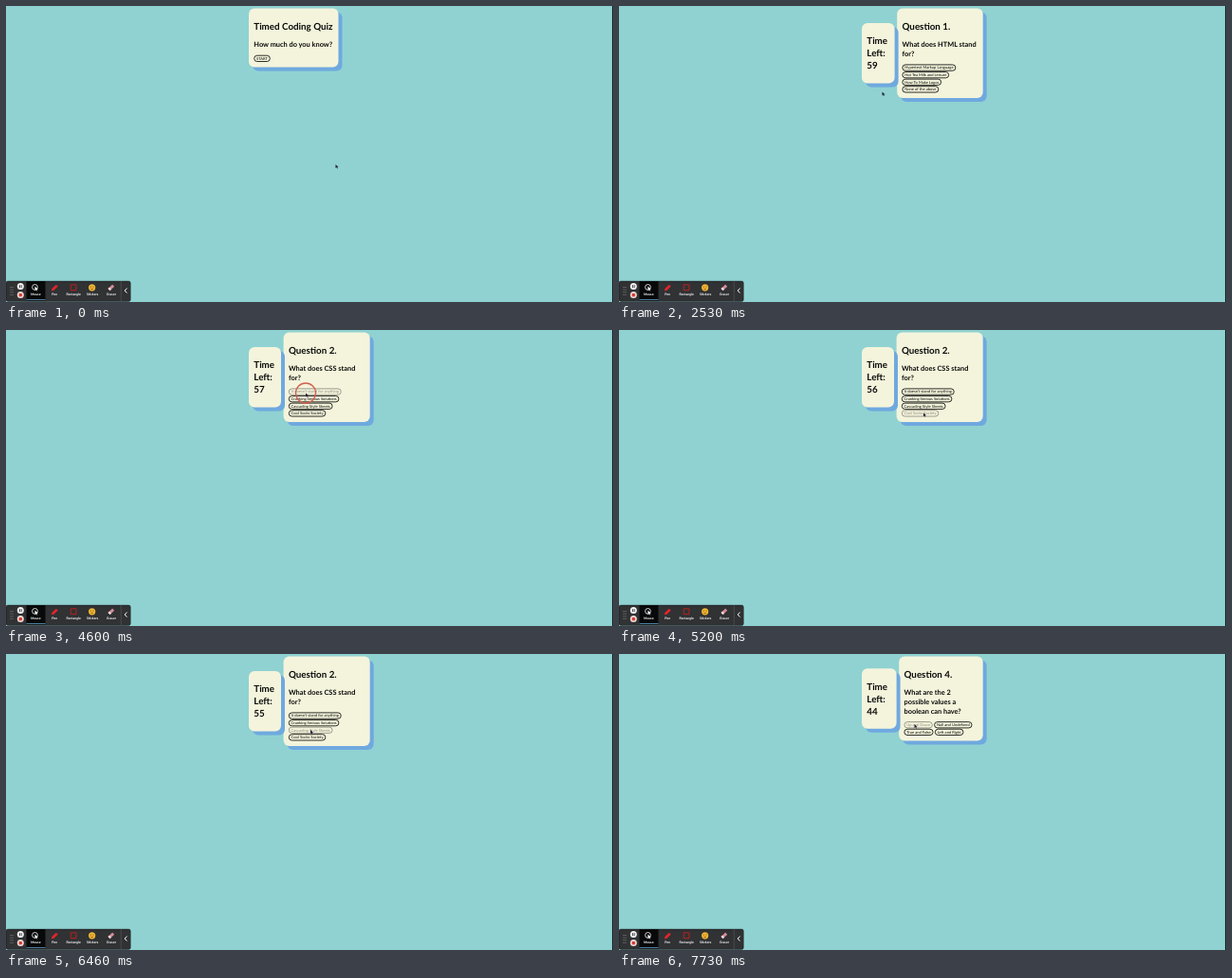
Recreate the animation shown at these times as an HTML page with a canvas. Size 640 px wide and 312 px high, loop 8000 ms.

```html
<!DOCTYPE html>
<html lang="en">
<head>
<meta charset="utf-8">
<title>Timed Coding Quiz</title>
<style>
  html, body { margin: 0; width: 100%; height: 100%; overflow: hidden; background: #90d2d2; }
  canvas { display: block; width: 640px; height: 312px; }
</style>
</head>
<body>
<canvas id="stage"></canvas>
<script>
const LOOP = 8000;
const BACK = '#90d2d2', CREAM = '#f4f4dc', SHADOW = '#6fa9df', INK = '#0b0b0b', FADED = '#8c8c80';
const LEFT = 256, TOP = 2.5, RIGHT = 383.7, PAD = 5.3;   // quiz area
const H1 = 9.8, H2 = 7.4, SMALL = 4.1;                   // font sizes
const LINE = 9.7, ROW = 7.6, BUTTON = 7.1;               // vertical steps

const canvas = document.getElementById('stage');
const ctx = canvas.getContext('2d');
const ratio = window.devicePixelRatio || 1;
canvas.width = 640 * ratio;
canvas.height = 312 * ratio;

const htmlQuestion = { title: 'Question 1.', text: ['What does HTML stand', 'for?'] };
const screens = [
  { at: 0, title: 'Timed Coding Quiz', text: ['How much do you know?'], rows: [['START']] },
  { at: 1200, timer: 32.3, ...htmlQuestion,
    rows: [['Hypertext Markup Language'], ['Hot Tea Milk and Leisure'], ['How To Make Logos', 'None of the above']] },
  { at: 2060, timer: 34.6, ...htmlQuestion,
    rows: [['Hypertext Markup Language'], ['Hot Tea Milk and Leisure'], ['How To Make Logos'], ['None of the above']] },
  { at: 4590, timer: 34, title: 'Question 2.', text: ['What does CSS stand', 'for?'],
    rows: [["It doesn't stand for anything"], ['Cranking Serious Solutions'], ['Cascading Style Sheets'], ['Cool Socks Society']] },
  { at: 6730, timer: 39.2, title: 'Question 3.', text: ['Which is an example', 'of a HTML', 'tag/element?'],
    rows: [['(div)', '[div]', '{div}', '<div>']] },
  { at: 7660, timer: 36.6, title: 'Question 4.', text: ['What are the 2', 'possible values a', 'boolean can have?'],
    rows: [['Up and Down', 'Null and Undefined'], ['True and False', 'Left and Right']] }
];

// Every new title follows a click.
const clicks = screens
  .filter((s, i) => i && s.title !== screens[i - 1].title)
  .map(s => s.at - 130);

const moves = [
  { from: 60, to: 660, x: 275.5, y: 56 },
  { from: 2060, to: 2530, x: 277.5, y: 90.5 },
  { from: 3130, to: 4400, x: 316, y: 66.5 },
  { from: 4660, to: 5460, x: 322.5, y: 94 },
  { from: 6000, to: 6450, x: 321, y: 80 },
  { from: 6730, to: 7020, x: 311.5, y: 74 }
];

function pointer(t) {
  let x = 347.5, y = 167;
  for (const m of moves) {
    const k = Math.min(1, Math.max(0, (t - m.from) / (m.to - m.from)));
    const ease = k * k * (3 - 2 * k);
    x += (m.x - x) * ease;
    y += (m.y - y) * ease;
  }
  return { x, y };
}

function secondsLeft(t) {
  const wrong = t >= screens.at(-1).at ? 10 : 0;
  return 59 - Math.floor((t - 2060) / 1014) - wrong;
}

function paint(fill, stroke, line = 1) {
  if (fill) { ctx.fillStyle = fill; ctx.fill(); }
  if (stroke) { ctx.strokeStyle = stroke; ctx.lineWidth = line; ctx.stroke(); }
}

function box(x, y, w, h, r, ...style) {
  ctx.beginPath();
  ctx.roundRect(x, y, w, h, r);
  paint(...style);
}

function disc(x, y, r, ...style) {
  ctx.beginPath();
  ctx.arc(x, y, r, 0, 2 * Math.PI);
  paint(...style);
}

function line(x0, y0, x1, y1, color, width) {
  ctx.beginPath();
  ctx.moveTo(x0, y0);
  ctx.lineTo(x1, y1);
  paint(null, color, width);
}

function arrow(x, y, size, fill) {
  ctx.beginPath();
  ctx.moveTo(x, y);
  ctx.lineTo(x, y + size);
  ctx.lineTo(x + size * .3, y + size * .75);
  ctx.lineTo(x + size * .75, y + size * .7);
  ctx.closePath();
  paint(fill);
  line(x + size * .2, y + size * .5, x + size * .5, y + size * 1.1, fill, size * .2);
}

function setFont(size, weight) {
  ctx.font = `${weight} ${size}px Lato, sans-serif`;
}

function write(str, x, y, size, weight = 700, fill = INK, align = 'left') {
  setFont(size, weight);
  ctx.textAlign = align;
  ctx.fillStyle = fill;
  ctx.fillText(str, x, y);
}

function panel(x, y, w, h) {
  box(x + 4, y + 4, w, h, 6, SHADOW);
  box(x, y, w, h, 6, CREAM);
}

function drawButton(label, x, y, w, mouse) {
  const hover = mouse.x > x && mouse.x < x + w && mouse.y > y && mouse.y < y + BUTTON;
  const color = hover ? FADED : INK;
  box(x + .4, y + .4, w - .8, BUTTON - .8, 3.1, null, color, .85);
  write(label, x + w / 2, y + 4.95, SMALL, 400, color, 'center');
}

function drawTimer(t, w, middle) {
  const lines = ['Time', 'Left:'];
  if (t >= 2060) lines.push(String(secondsLeft(t)));
  const h = 24.5 + 13 * lines.length, y = middle - h / 2;
  panel(LEFT, y, w, h);
  lines.forEach((str, i) => write(str, LEFT + PAD, y + 22.4 + 13 * i, H1));
}

function drawScreen(t, mouse) {
  const s = screens.findLast(item => item.at <= t);
  const x = s.timer ? LEFT + s.timer + 2.6 : LEFT;
  const w = s.timer ? RIGHT - x : 94.5;
  const h = 44.7 + LINE * s.text.length + ROW * s.rows.length;
  panel(x, TOP, w, h);
  if (s.timer) drawTimer(t, s.timer, TOP + h / 2);

  write(s.title, x + PAD, 25.1, H1);
  s.text.forEach((str, i) => write(str, x + PAD, 43.3 + LINE * i, H2));
  s.rows.forEach((row, i) => {
    let bx = x + PAD;
    for (const label of row) {
      setFont(SMALL, 400);
      const bw = ctx.measureText(label).width + 5.4;
      drawButton(label, bx, 42.1 + LINE * s.text.length + ROW * i, bw, mouse);
      bx += bw + 1.5;
    }
  });
}

const tools = [
  ['Mouse', () => {
    disc(30.5, 296.4, 2.9, null, '#e6e6e6', .9);
    arrow(30.5, 295.6, 4.2, '#fff');
  }],
  ['Pen', () => {
    line(49, 299.2, 53.8, 294.6, '#e5252a', 2.7);
    line(48.3, 300, 50, 298.4, '#e5252a', 1.2);
  }],
  ['Rectangle', () => box(68.2, 293.8, 5.8, 5.8, 0, null, '#c8201f', .9)],
  ['Stickers', () => {
    disc(90.7, 296.8, 3.6, '#f2b632');
    for (const dx of [-1.3, 1.3]) disc(90.7 + dx, 296, .5, '#5a3c14');
    line(89.4, 298.4, 92, 298.4, '#5a3c14', .6);
  }],
  ['Eraser', () => {
    line(108.6, 299, 113.2, 294.6, '#d98c98', 2.9);
    line(108.6, 299, 110, 297.6, '#f0e2e2', 2.9);
  }]
];

function drawToolbar() {
  box(0, 290, 131.3, 21.4, 2, '#303234', 'rgba(0, 0, 0, .35)');
  box(21.5, 290, 20, 20.5, 0, '#08090a');
  box(21.5, 309, 20, 1, 0, '#4b7d9c');
  for (let i = 0; i < 8; i++) disc(5 + (i % 2) * 2, 296.5 + (i >> 1) * 2.6, .5, '#a0a0a0');

  disc(15.3, 295.6, 3.5, '#f2f2f2');
  for (const dx of [-.9, .9]) line(15.3 + dx, 294.1, 15.3 + dx, 297.1, '#333', .9);
  disc(15.3, 304.6, 3.5, '#f0d8d4');
  box(13.7, 303, 3.2, 3.2, .6, '#d93a32');

  tools.forEach(([name, icon], i) => {
    icon();
    write(name, 31.2 + i * 20, 305.4, 3.5, 700, '#fff', 'center');
  });
  line(121.3, 290, 121.3, 311, '#595b5d', .6);
  for (const dy of [-2.5, 2.5]) line(125.2, 300, 127.6, 300 + dy, '#fff', 1);
}

function drawPointer(t, { x, y }) {
  const age = t - clicks.find(c => t >= c && t < c + 190);
  if (age >= 0) disc(x, y, 3 + 7.5 * Math.min(1, age / 130), null, '#d2604e', 1.3);
  arrow(x, y, 4, '#25203a');
}

function frame(now) {
  const t = now % LOOP, mouse = pointer(t);
  ctx.setTransform(ratio, 0, 0, ratio, 0, 0);
  ctx.textRendering = 'geometricPrecision';
  box(0, 0, 640, 312, 0, BACK);
  box(639, 0, 1, 312, 0, '#1c3030');
  drawScreen(t, mouse);
  drawToolbar();
  drawPointer(t, mouse);
  requestAnimationFrame(frame);
}

requestAnimationFrame(frame);
</script>
</body>
</html>
```
